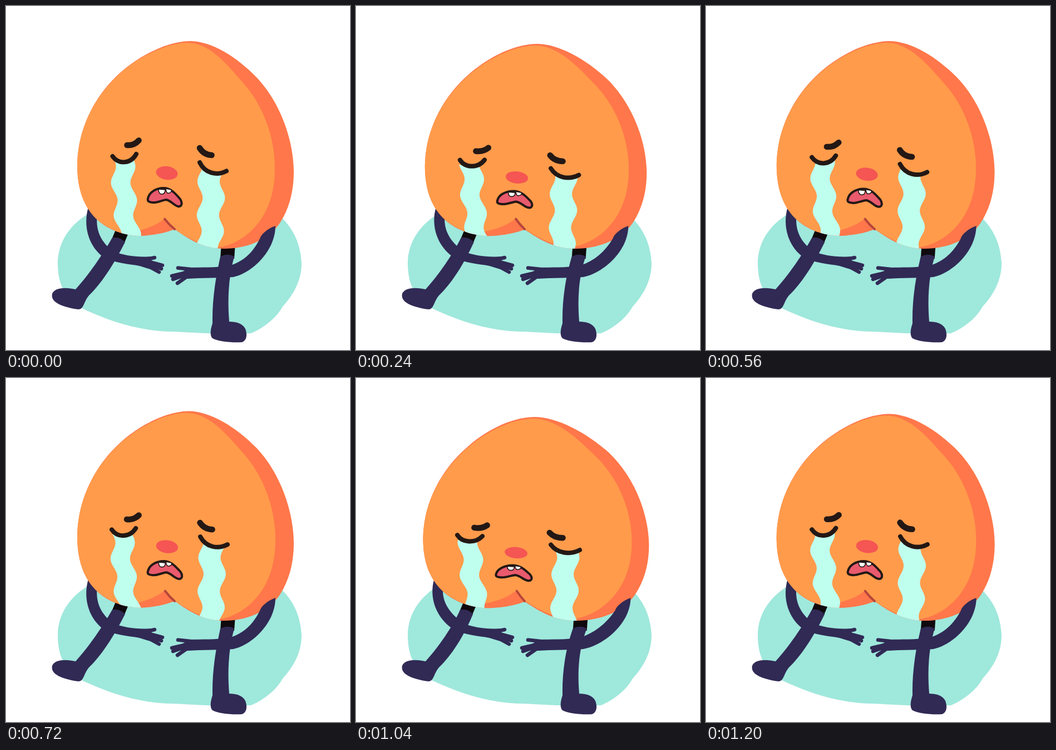
These frames come from a looping animation (618x618 px, 1280 ms). An HTML page:

```html
<!DOCTYPE html>
<html lang="en">
<head>
<meta charset="utf-8">
<title>Crying peach</title>
<style>
  html, body { margin: 0; height: 100%; overflow: hidden; background: #fff; }
  svg { display: block; width: 100vw; height: 100vh; }
  .navy { fill: #302a55; }
  .fingers { fill: none; stroke: #302a55; stroke-width: 6.5; stroke-linecap: round; }
  .ink { fill: none; stroke: #231815; stroke-linecap: round; stroke-linejoin: round; }
  .ink path { vector-effect: non-scaling-stroke; }
  .brow { stroke-width: 10.5; }
  .lid { stroke-width: 8; }
  .lip { fill: #e95a6d; stroke-width: 4; }
  .tooth { fill: #fff; stroke-width: 1.6; }
  .tear { fill: #bfffee; }
</style>
</head>
<body>
<svg viewBox="0 0 618 618">
  <clipPath id="inside"><path id="clip"/></clipPath>
  <path fill="#9fe8dc" d="M150,372C115,392 92,425 93,465C94,500 104,522 136,543C190,568 240,584 300,585C340,587 385,590 440,588C460,580 485,562 497,540C515,520 531,495 531,462C529,425 515,400 497,382Z"/>
  <path id="cuffL" fill="#0f0a0d"/>
  <path id="cuffR" fill="#0f0a0d"/>
  <path id="legL" class="navy"/>
  <path id="legR" class="navy"/>
  <path id="armL" class="navy"/>
  <path class="fingers" d="M248,456L267,452M252,458L281,466M252,462L279,472M250,464L275,478"/>
  <path id="body" fill="#ff774a"/>
  <path id="light" fill="#ff9b4b"/>
  <path id="cleft" fill="none" stroke="#b5453b" stroke-width="4" stroke-linecap="round"/>
  <g clip-path="url(#inside)">
    <path id="tearL" class="tear"/>
    <path id="tearR" class="tear"/>
  </g>
  <g id="face" class="ink">
    <g id="eyeL">
      <path class="brow" d="M217.500,250Q230,251 238.500,241.500"/>
      <path class="lid" d="M191.500,270C202,285 224,284 234,266"/>
    </g>
    <g id="eyeR">
      <path class="brow" d="M348,255Q355,267 369.500,268"/>
      <path class="lid" d="M348,281C357,300 378,306 396,296.500"/>
    </g>
    <ellipse cx="289" cy="300" rx="19.500" ry="12" transform="rotate(8 289 300)" fill="#f55553" stroke="none"/>
    <path class="lip" d="M255,346C257,335 269,327 283,327C297,327 305,338 313,347C318,355 315,361 309,360C301,358 297,350 288,348C279,349 272,354 263,353C255,352 254,350 255,346Z"/>
    <path class="tooth" d="M274,329q0,9 6,9q6,0 6,-8zM287,328q1,10 6,8q5,-1 4,-6z"/>
  </g>
  <path id="armR" class="navy"/>
  <path class="fingers" d="M332,473L309,470.500M328,478L298,485M328,481L300,491M328,484L308,498"/>
</svg>
<script>
const $ = id => document.getElementById(id);
const draw = (id, d) => $(id).setAttribute('d', d);
const move = (id, t) => $(id).setAttribute('transform', t);

const STEP = 80, COUNT = 16, WAVE = 60;

// Per step: sideways bulge of the body, squash of the face, height of the crown
const bulge = [0, .2, .42, .7, .92, 1.02, .8, .2, -.1, 0, .45, .88, 1.15, 1.25, .8, .22];
const squash = [0, .2, .45, .72, .93, 1, .8, .2, -.05, .27, .65, 1, 1.2, 1.25, .8, .25];
const crown = [63, 64, 66, 68, 70, 70.5, 68, 63, 60, 59.5, 63, 67, 69.5, 70, 67.5, 64.5];

const BODY = 'M330,63C285,64 235,93 205,120C160,160 129,220 128,285C128,330 140,362 165,385' +
  'C185,403 212,412 240,413C268,412 288,407 303,401C330,420 355,436 392,436' +
  'C430,436 470,422 492,390C508,365 517,335 517,297C516,235 490,170 450,128C415,92 370,63 330,63Z';
const LIGHT = 'M325,66C285,67 235,94 205,121C160,161 129,220 128,285C128,330 140,362 165,385' +
  'C180,397 195,404 208,408C240,405 265,398 285,382L303,401C330,419 352,430 378,434' +
  'C420,430 483,390 483,292C483,225 455,170 425,137C395,102 365,66 325,66Z';

function warp(path, left, right, top, lean) {
  return path.replace(/([\d.]+),([\d.]+)/g, (_, x, y) => {
    const up = (436 - y) / 373;
    const nx = left + (x - 128) * (right - left) / 389 + lean * up ** 8;
    return nx.toFixed(2) + ',' + (436 - up * (436 - top)).toFixed(2);
  });
}

// A wavy ribbon from (x0, ya..yb) down to x1 at the bottom; crest is the y of a leftmost bend
function tear(x0, x1, ya, yb, dip, bottom, half, crest) {
  const edge = (side, y) => {
    const mid = x0 + (x1 - x0) * ((y - ya) / (bottom - ya)) ** 2;
    return (mid + side * half - 5 * Math.cos((y - crest) / WAVE * 2 * Math.PI)).toFixed(2) + ',' + y.toFixed(2);
  };
  const pts = [];
  for (let y = bottom; y > ya; y -= 4) pts.push(edge(-1, y));
  let d = 'M' + pts.join('L') + 'L' + edge(-1, ya) + `Q${x0},${dip} ` + edge(1, yb);
  for (let y = yb + 4; y <= bottom; y += 4) d += 'L' + edge(1, y);
  return d + 'Z';
}

function limbs(l, r) {
  const a = l / 2, b = r / 2;
  draw('cuffL', `M${200 + a},395L${222 + a},403L${212 + a},427L${190 + a},419Z`);
  draw('legL', `M${191 + a},416C175,445 147,485 125,509C112,506 88,504 83,517C80,530 95,540 130,545
    C140,545 139,532 149,520C172,498 193,465 ${214 + a},424Q${204 + a},414 ${191 + a},416Z`);
  draw('cuffR', `M${387 + b},425H${412 + b}L${410 + b},454H${385 + b}Z`);
  draw('legR', `M${385 + b},450C379,480 370,520 371,570C367,582 366,592 371,597C382,603 405,605 424,604
    C434,600 433,588 430,580C425,570 413,567 401,567C398,530 399,490 ${410 + b},450Q${398 + b},443 ${385 + b},450Z`);
  draw('armL', `M${148 + l},361C${138 + l},395 ${148 + a},432 176,452C195,462 220,463 240,467L266,475L260,450
    C235,452 212,448 193,441C172,425 ${160 + l},405 ${164 + l},374Z`);
  draw('armR', `M${484 + r},395C${470 + r},400 ${458 + r},410 ${456 + r},418C${444 + b},442 428,458 403,466
    C375,471 350,469 330,470L316,478L326,490C350,488 385,489 408,487C${442 + b},480 ${484 + r},440 ${484 + r},395Z`);
}

function render(i) {
  const k = squash[i], l = -6 * bulge[i], r = 7.5 * bulge[i];
  const shape = (path, extra) => warp(path, 128 + l, 517 + r + extra, crown[i], -9 * k);
  const body = shape(BODY, 0);
  draw('body', body);
  draw('clip', body);
  draw('light', shape(LIGHT, 4 * k));
  draw('cleft', `M${285 + 3 * k},382.500Q${293 + 2 * k},393 303,401`);
  limbs(l, r);

  const low = y => 385 - (385 - y) * (1 - .13 * k);
  const flow = WAVE * i / 8;
  draw('tearL', tear(210 - 4 * k, 222 - 2 * k, low(277) - 3 * k, low(275) - 3 * k, low(284) - 3 * k, 420, 17.5, 318 + flow));
  draw('tearR', tear(369 + 6 * k, 365 + 6 * k, low(287), low(299), low(304), 440, 20, 315 + flow));

  const x = 289 + (i > 8 ? .8 - 1.8 * k : 0);
  move('face', `translate(${x} 385) scale(${1 + .044 * k} ${1 - .13 * k}) translate(-289 -385)`);
  move('eyeL', `translate(${-1.2 * k} ${-3.7 * k}) rotate(${7 * k} 212 262)`);
  move('eyeR', `rotate(${-4 * k} 371 278)`);
}

let start;
function tick(now) {
  start ??= now;
  render(Math.floor((now - start) / STEP) % COUNT);
  requestAnimationFrame(tick);
}
render(0);
requestAnimationFrame(tick);
</script>
</body>
</html>
```
